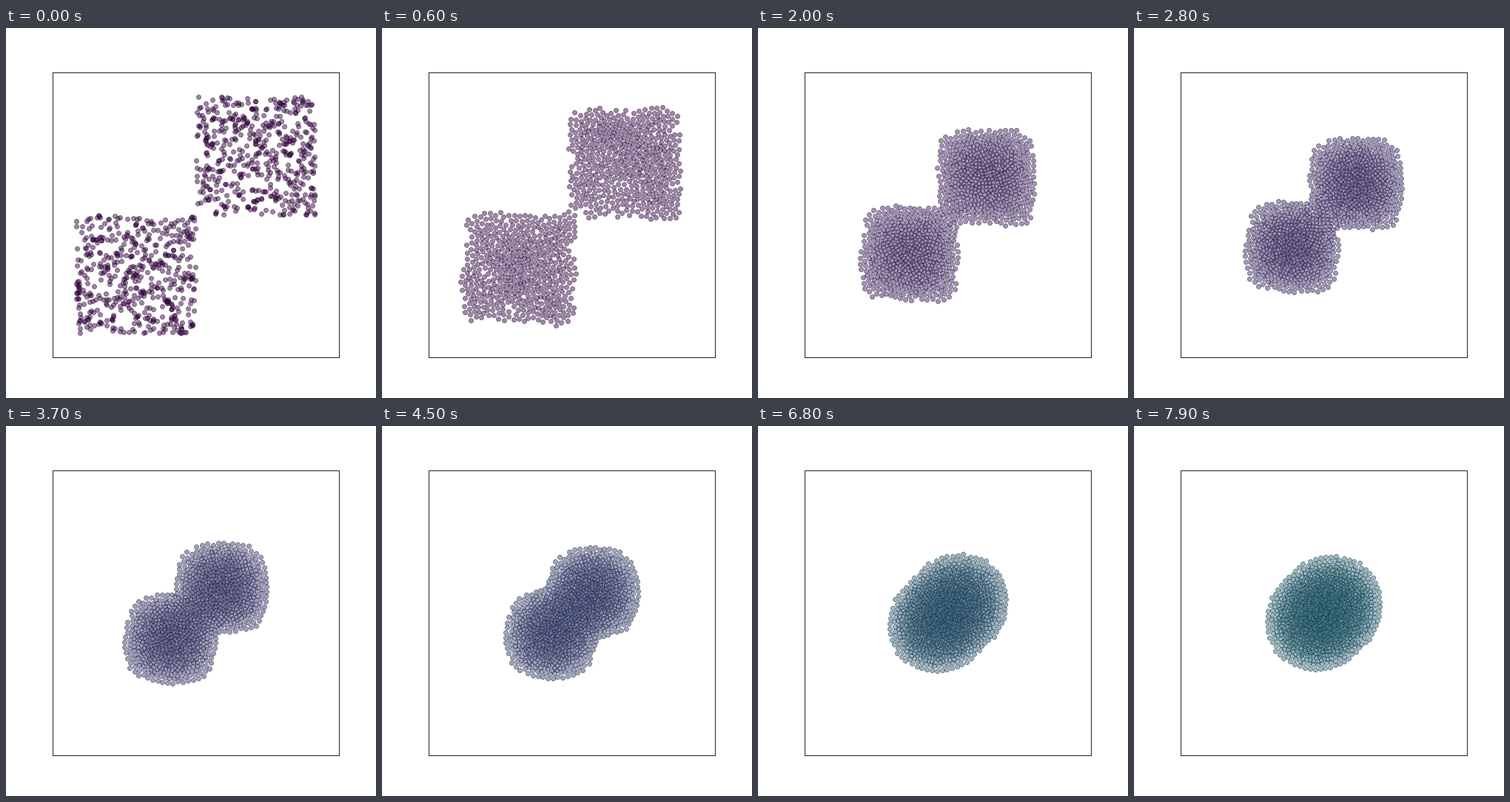
Recreate the animation shown at these times as a matplotlib script. Size 500 px wide and 500 px high, loop 8 s.

```python
import numpy as np
import matplotlib.pyplot as plt
from matplotlib.animation import FuncAnimation

FRAMES, INTERVAL = 80, 100
COLOR_SPAN = 200     # frames for one full sweep of the colormap
PER_BLOCK = 500
PULL = 0.023         # share of the way to the centre per frame
PUSH = 0.8           # response to overlap per frame
REACH = 0.05         # distance below which two points repel
SUBSTEPS = 8


def start_points(rng):
    """Two unit squares that touch at the origin."""
    upper = rng.uniform(0, 1, (PER_BLOCK, 2))
    lower = rng.uniform(-1, 0, (PER_BLOCK, 2))
    return rng.permutation(np.vstack([upper, lower]))


def close_pairs(pos, cutoff):
    x, y = pos.T
    d2 = (x[:, None] - x) ** 2 + (y[:, None] - y) ** 2
    return np.nonzero(np.triu(d2 < cutoff ** 2, 1))


def advance(pos):
    """One frame: pull to the centre while overlapping points push apart."""
    i, j = close_pairs(pos, 1.8 * REACH)
    n = len(pos)
    for _ in range(SUBSTEPS):
        gap = pos[i] - pos[j]
        dist = np.hypot(gap[:, 0], gap[:, 1]) + 1e-9
        force = np.maximum(REACH - dist, 0) / dist
        push = gap * force[:, None]
        total = np.column_stack([
            np.bincount(i, push[:, a], n) - np.bincount(j, push[:, a], n)
            for a in (0, 1)])
        pos = pos + (PUSH * total - PULL * pos) / SUBSTEPS
    return pos


path = [start_points(np.random.default_rng(4))]
while len(path) < FRAMES:
    path.append(advance(path[-1]))

fig, ax = plt.subplots(figsize=(5, 5), dpi=100)
ax.set(xlim=(-1.2, 1.2), ylim=(-1.2, 1.2), xticks=[], yticks=[])
for spine in ax.spines.values():
    spine.set_edgecolor("0.2")

cmap = plt.get_cmap("viridis")
dots = ax.scatter(*path[0].T, s=20, color=cmap(0.0), alpha=0.5,
                  edgecolors="k", linewidths=0.5)


def draw(k):
    dots.set_offsets(path[k])
    dots.set_facecolor(cmap(k / COLOR_SPAN))
    return dots,


anim = FuncAnimation(fig, draw, frames=FRAMES, interval=INTERVAL,
                     repeat=True, repeat_delay=0)
plt.show()
```
